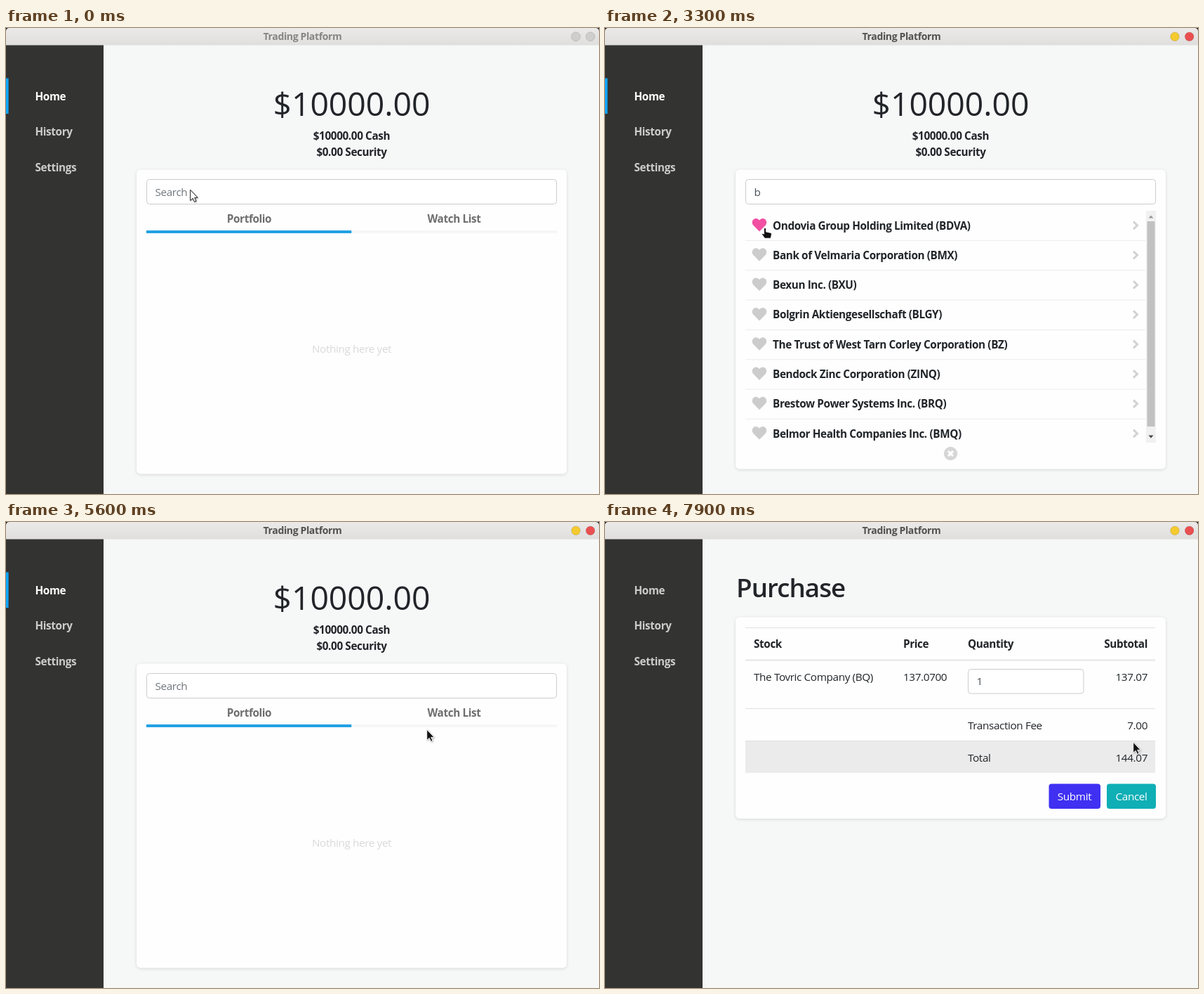
Write an HTML page that moves like this. It is 845 by 663 pixels and loops after 8 s.

```html
<!DOCTYPE html>
<html lang="en">
<head>
<meta charset="utf-8">
<title>Trading Platform</title>
<style>
html, body { margin: 0; height: 100%; overflow: hidden; background: #222; }
svg { display: block; width: 100vw; height: 100vh; }
text { font: 15.3px "Open Sans", "Noto Sans", sans-serif; letter-spacing: -.025em; fill: #212529; white-space: pre; }
.b { font-weight: 700; }
.mid { text-anchor: middle; }
.end { text-anchor: end; }
.nav { fill: #ccc; }
.tab { fill: #6e6e6e; }
.pale { fill: #d9d9d9; }
.white { fill: #fff; }
.card { fill: #fefefe; filter: drop-shadow(0 1px 2px rgba(0,0,0,.13)); }
.field { fill: #fff; stroke: #ccc; }
</style>
</head>
<body>
<svg viewBox="0 0 845 663">
  <defs>
    <linearGradient id="bar" x2="0" y2="1"><stop stop-color="#ebeae9"/><stop offset="1" stop-color="#dfdedd"/></linearGradient>
    <clipPath id="view"><rect x="200" y="260" width="585" height="330"/></clipPath>
    <path id="heart" d="M0 9.5L-8.6.8C-11.4-2.2-10.4-7-7-8.5C-4.5-9.6-1.8-8.8 0-6.5C1.8-8.8 4.5-9.6 7-8.5C10.4-7 11.4-2.2 8.6.8Z"/>
  </defs>

  <path d="M0 25V5Q0 0 5 0H840Q845 0 845 5V25Z" fill="url(#bar)"/>
  <text id="title" class="b mid" x="422.5" y="17" style="font-size:14px">Trading Platform</text>
  <circle id="yellow" cx="812" cy="12.2" r="6.3"/>
  <circle id="red" cx="832.7" cy="12.2" r="6.3"/>

  <rect y="24.5" width="139" height="639" fill="#333331"/>
  <rect x="139" y="24.5" width="706" height="639" fill="#f6f7f7"/>
  <rect id="mark" y="71.5" width="3.6" height="50.5" fill="#0ea5f8"/>
  <text id="homeLink" class="b nav" x="41.5" y="102.5">Home</text>
  <text class="b nav" x="41.5" y="153">History</text>
  <text class="b nav" x="41.5" y="204">Settings</text>

  <g id="home">
    <text class="mid" x="492.5" y="125" style="font-size:46.3px;letter-spacing:0">$10000.00</text>
    <text class="b mid" x="492.5" y="159">$10000.00 Cash</text>
    <text class="b mid" x="492.5" y="181.5">$0.00 Security</text>
    <rect id="card" class="card" x="186" y="201.5" width="613" rx="6"/>
    <rect id="ring" x="198.5" y="214" width="588" height="38.5" rx="5.5" fill="none" stroke="#bfd4fa" stroke-width="3"/>
    <rect id="search" class="field" x="200.5" y="215.5" width="584" height="35" rx="4"/>
    <text id="query" x="212.5" y="239"></text>
    <rect id="caret" y="225" width="1" height="17" fill="#333"/>

    <g id="tabs">
      <text class="b tab mid" x="346.5" y="277">Portfolio</text>
      <text class="b tab mid" x="638.5" y="277">Watch List</text>
      <rect id="tab1" x="200" y="288" width="292.5" height="4"/>
      <rect id="tab2" x="492.5" y="288" width="292.5" height="4"/>
      <text id="empty" class="pale mid" x="492.5" y="462">Nothing here yet</text>
      <g id="watch">
        <use href="#heart" x="220" y="322" fill="#f250a3"/>
        <text id="watchName" class="b" x="239" y="318"></text>
        <text x="239" y="340" style="fill:#ccc">$137.0700</text>
        <rect id="buy" x="736" y="301" width="39.5" height="29" rx="3"/>
        <text class="white mid" x="755.5" y="320" style="font-size:13.6px">Buy</text>
        <rect x="200" y="354.5" width="585" height="2" fill="#f2f2f2"/>
      </g>
    </g>

    <g id="list">
      <g id="rows" clip-path="url(#view)"></g>
      <rect x="771" y="260" width="14" height="330" fill="#f1f1f1"/>
      <path d="M774.5 270.5h7l-3.5-4z" fill="#999"/>
      <path d="M774.5 579.5h7l-3.5 4z" fill="#444"/>
      <rect id="thumb" x="772.5" y="275" width="11" fill="#c1c1c1"/>
      <circle cx="492.5" cy="605.5" r="9.7" fill="#d6d6d6"/>
      <path d="M489 602l7 7m0-7l-7 7" stroke="#fff" stroke-width="3"/>
    </g>
  </g>

  <g id="purchase">
    <text x="187" y="107" style="font-size:36.7px;font-weight:600">Purchase</text>
    <rect class="card" x="186" y="135.5" width="613" height="286.5" rx="6"/>
    <rect x="200" y="312" width="584" height="45" fill="#ebebeb"/>
    <path d="M200 150.5h584M200 265.5h584M200 311.5h584M200 196h584m-584 1h584" stroke="#dee0e2"/>
    <text class="b" x="212" y="178.5">Stock</text>
    <text class="b" x="425" y="178.5">Price</text>
    <text class="b" x="517" y="178.5">Quantity</text>
    <text class="b end" x="773" y="178.5">Subtotal</text>
    <text id="stock" x="212" y="225.5"></text>
    <text x="425" y="225.5">137.0700</text>
    <rect class="field" x="517.5" y="209.5" width="164.5" height="34.5" rx="4"/>
    <text x="529.5" y="232" style="fill:#495057">1</text>
    <text class="end" x="773" y="225.5">137.07</text>
    <text x="517" y="294.5">Transaction Fee</text>
    <text class="end" x="773" y="294.5">7.00</text>
    <text x="517" y="340.5">Total</text>
    <text class="end" x="773" y="340.5">144.07</text>
    <rect x="632.5" y="372.5" width="73.5" height="35.5" rx="4" fill="#3f30f2"/>
    <text class="white mid" x="669" y="396">Submit</text>
    <rect x="715" y="372.5" width="70" height="35.5" rx="4" fill="#0fafb5"/>
    <text class="white mid" x="750" y="396">Cancel</text>
  </g>

  <g id="pointer">
    <path id="arrow" transform="translate(-.3 -.7) scale(.95)" d="M0 0V16L3.7 12.7 6.2 18 8.8 16.8 6.3 11.6H11Z" style="filter:drop-shadow(1px 1px 1px rgba(0,0,0,.3))"/>
    <path id="beam" d="M-3-6.5H-1L0-5.5 1-6.5H3M0-5.5V6M-3 7H-1L0 6 1 7H3" fill="none" stroke="#111" stroke-width="1.3"/>
    <path id="hand" transform="translate(.5 -.5) scale(1.05)" d="M-2 .5Q-.5-1 1 .5V5L7 6.3Q9 7 8.5 9L7.5 14H-1L-5 8.5Q-5 6.5-2 8Z" fill="#111" stroke="#fff"/>
  </g>
</svg>
<script>
const $ = id => document.getElementById(id);
const show = (id, on) => $(id).style.display = on ? '' : 'none';
const fill = (id, color) => $(id).style.fill = color;
const mix = (a, b, k) => a + (b - a) * k;

const stocks = [
  'The Tovric Company (BQ)',
  'Ondovia Group Holding Limited (BDVA)',
  'Bank of Velmaria Corporation (BMX)',
  'Bexun Inc. (BXU)',
  'Bolgrin Aktiengesellschaft (BLGY)',
  'The Trust of West Tarn Corley Corporation (BZ)',
  'Bendock Zinc Corporation (ZINQ)',
  'Brestow Power Systems Inc. (BRQ)',
  'Belmor Health Companies Inc. (BMQ)'
];
$('watchName').textContent = $('stock').textContent = stocks[0];
$('rows').innerHTML = stocks.map((name, i) => `<g transform="translate(0 ${i * 42.3})">
  <use href="#heart" x="220" y="280" fill="#ccc"/>
  <text class="b" x="239" y="286.5">${name}</text>
  <path d="M753 275.5l5.5 5.3-5.5 5.3" fill="none" stroke="#d2d2d2" stroke-width="3"/>
  <path d="M200 302.5h570" stroke="#ececec"/></g>`).join('');
const rows = [...$('rows').children];
const names = rows.map(r => r.querySelector('text'));
const firstHeart = rows[0].querySelector('use');

// pointer path: time, x, y
const path = [
  [0, 263, 231], [100, 266, 234], [2000, 266, 234], [2200, 284, 272], [2400, 304, 312],
  [2500, 270, 302], [2600, 234, 287], [2700, 228, 285], [3700, 228, 285], [3900, 290, 320],
  [4200, 567, 500], [4300, 620, 545], [4400, 605, 585], [4500, 535, 604], [4600, 494, 605],
  [5000, 494, 605], [5100, 510, 560], [5300, 585, 375], [5400, 598, 321], [5500, 598, 321],
  [5600, 600, 296], [5800, 624, 282], [6500, 624, 282], [6800, 512, 330], [7000, 580, 337],
  [7200, 695, 324], [7400, 753, 314], [8000, 753, 314]
];
const within = (t, ...spans) => spans.some(([a, b]) => t >= a && t < b);

function draw(t) {
  const active = t >= 800, buying = t >= 7800;
  const listed = within(t, [1600, 5000]), removed = t >= 3300;
  const focus = within(t, [800, 3100]) ? (t < 900 ? .6 : 1) : 0;

  fill('title', active ? '#50504e' : '#858583');
  fill('yellow', active ? '#f4ca30' : '#cfcecd');
  fill('red', active ? '#ea4f50' : '#cfcecd');
  for (const id of ['yellow', 'red']) $(id).style.stroke = active ? 'rgba(0,0,0,.12)' : '#bbb';

  show('home', !buying);
  show('purchase', buying);
  show('mark', !buying);
  fill('homeLink', buying ? '#ccc' : '#fff');

  $('card').setAttribute('height', listed ? 426 : 433);
  $('ring').style.opacity = focus;
  $('search').style.stroke = focus ? '#86aef0' : '#ccc';
  $('query').textContent = listed ? 'b' : 'Search';
  fill('query', listed ? '#495057' : '#70767c');
  $('caret').setAttribute('x', listed ? 221 : 212);
  show('caret', within(t, [900, 1400], [1600, 2100], [2600, 3100]));

  show('list', listed);
  show('tabs', !listed);
  names.forEach((n, i) => n.textContent = stocks[i + removed] || '');
  rows[8].style.display = removed ? 'none' : '';
  firstHeart.style.fill = within(t, [2600, 3800]) ? '#f250a3' : '#ccc';
  $('thumb').setAttribute('height', removed ? 292 : 260);

  const watching = t >= 6200;
  fill('tab1', watching ? '#f5f6f6' : '#22a1e4');
  fill('tab2', t >= 5800 ? '#22a1e4' : '#f5f6f6');
  show('empty', !watching);
  show('watch', watching);
  const hover = Math.min(1, Math.max(0, (t - 7300) / 300));
  fill('buy', `rgb(${mix(15, 12, hover)},${mix(175, 143, hover)},${mix(181, 148, hover)})`);

  const i = path.findIndex(p => p[0] > t), [t0, x0, y0] = path[i - 1], [t1, x1, y1] = path[i];
  const k = (t - t0) / (t1 - t0);
  $('pointer').setAttribute('transform', `translate(${mix(x0, x1, k)} ${mix(y0, y1, k)})`);
  const beam = within(t, [100, 1600], [2100, 2200]);
  const hand = within(t, [2600, 3800], [4600, 5000], [5800, 6600], [7300, 7900]);
  show('pointer', !within(t, [1600, 2100]));
  show('beam', beam);
  show('hand', hand);
  show('arrow', !beam && !hand);
  fill('arrow', t < 100 ? '#fff' : '#111');
  $('arrow').style.stroke = t < 100 ? '#111' : '#fff';
}

// the screen advances in tenths of a second
function tick() {
  draw(Math.floor(performance.now() % 8000 / 100) * 100);
  requestAnimationFrame(tick);
}
tick();
</script>
</body>
</html>
```
